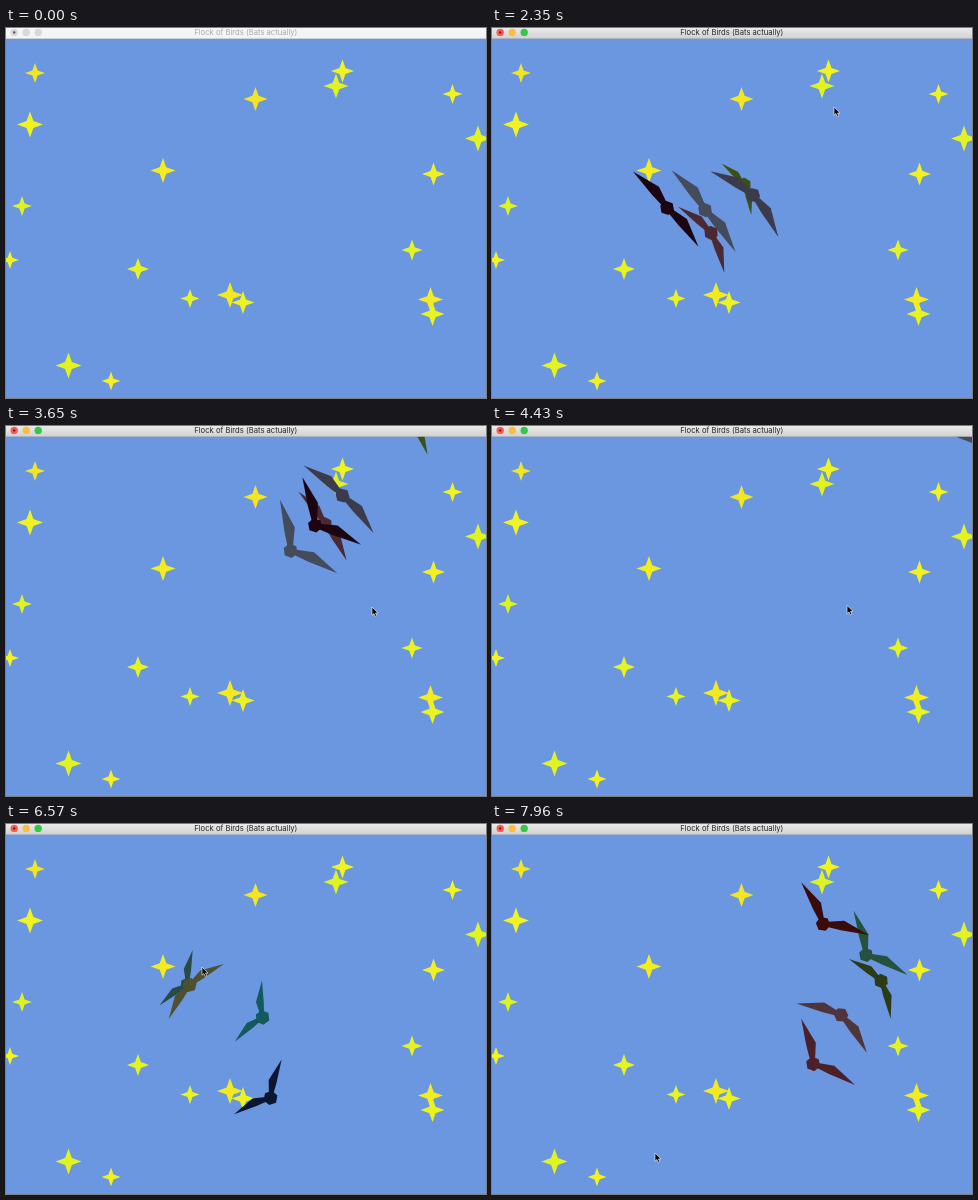
An HTML page with a canvas that plays this animation: 480x370 px, repeating every 8000 ms.

```html
<!DOCTYPE html>
<html lang="en">
<head>
<meta charset="utf-8">
<title>Flock of Birds (Bats actually)</title>
<style>
  html, body { margin: 0; width: 100%; height: 100%; overflow: hidden; }
  canvas { display: block; }
</style>
</head>
<body>
<canvas id="stage" width="480" height="370"></canvas>
<script>
const ctx = document.getElementById('stage').getContext('2d');
const LOOP = 8000, ACTIVATE = 870;
const FLAP_PERIOD = 390, SPREAD = 88, FLAP = 26;
const CRUISE = 0.1, RUSH = 400;

// x, y, radius
const stars = [
  [29, 45, 10], [24, 96.5, 13], [16, 178, 10], [4, 232, 9], [62.5, 337.5, 13],
  [105, 353, 9.5], [132, 241, 11], [157, 142.5, 12.5], [184, 270.5, 9.5], [224, 267, 13],
  [237, 274.5, 11.5], [249.5, 71, 12], [336.5, 43, 11.5], [330, 58, 12.5], [446.5, 66, 10],
  [472, 110.5, 13], [427.5, 146, 11.5], [406, 222, 10.5], [424.5, 271.5, 12.5], [426.5, 286, 12]
];

// Bats pass their place (x, y) at the flock's time. Headings and flap phases are in degrees.
const flocks = [
  {
    time: 2350, enter: [0, 1500], leave: [3700, 4900],
    bats: [
      { color: '#434b5c', x: 213, y: 182, heading: -38, span: 52, phase: 170, drift: [0.055, -0.044] },
      { color: '#3c5012', x: 252, y: 157, heading: -30, span: 31, phase: 45, drift: [0.12, -0.12] },
      { color: '#4b2932', x: 219, y: 205, heading: -35, span: 42, phase: 45, drift: [0.077, -0.082] },
      { color: '#1c0410', x: 175, y: 180, heading: -41, span: 50, phase: 170, drift: [0.103, -0.062] },
      { color: '#3c3b4c', x: 261, y: 167, heading: -46, span: 49, phase: 40, drift: [0.058, -0.075] }
    ]
  },
  {
    time: 5300, enter: [4100, 5200], leave: [6700, 7900],
    bats: [
      { color: '#0b1732', x: 323, y: 354, heading: 221, span: 40, phase: 205, drift: [-0.046, -0.063] },
      { color: '#294a47', x: 334, y: 219, heading: 211, span: 35, phase: 215, drift: [-0.12, -0.046] },
      { color: '#125a5b', x: 329, y: 229, heading: 204, span: 37, phase: 205, drift: [-0.057, -0.028] },
      { color: '#4f5030', x: 359, y: 283, heading: 225, span: 40, phase: 50, drift: [-0.138, -0.096] }
    ]
  },
  {
    time: 7960, enter: [6650, 7900], leave: [8000, 9000],
    bats: [
      { color: '#24523c', x: 374, y: 131, heading: -40, span: 46, phase: -60 },
      { color: '#390b0a', x: 331, y: 100, heading: -52, span: 47, phase: -60 },
      { color: '#2b3b16', x: 389, y: 157, heading: -35, span: 39, phase: 60 },
      { color: '#50343b', x: 349, y: 191, heading: -55, span: 46, phase: 60 },
      { color: '#4b2028', x: 321, y: 240, heading: -39, span: 47, phase: -60 }
    ]
  }
];

// Arrival time, x, y
const cursorStops = [
  [870, 345, 5], [1250, 342, 79], [3600, 366, 181],
  [5200, 175, 154], [6500, 196, 143], [7900, 163, 329]
];

const mix = (a, b, u) => a + (b - a) * u;
const radians = degrees => degrees * Math.PI / 180;
const progress = (t, [from, to]) => Math.min(1, Math.max(0, (t - from) / (to - from)));

function polygon(points, color) {
  ctx.fillStyle = color;
  ctx.beginPath();
  for (const [x, y] of points) ctx.lineTo(x, y);
  ctx.fill();
}

function ring(x, y, count, radiusAt, turn = 0) {
  return Array.from({ length: count }, (_, i) => {
    const a = turn + i * 2 * Math.PI / count, r = radiusAt(i);
    return [x + r * Math.cos(a), y + r * Math.sin(a)];
  });
}

function circle(x, y, r, color) {
  ctx.fillStyle = color;
  ctx.beginPath();
  ctx.arc(x, y, r, 0, 2 * Math.PI);
  ctx.fill();
}

function drawStar([x, y, r], i) {
  const hue = 56 + i * 5 % 11;
  polygon(ring(x, y, 8, k => k % 2 ? r * 0.37 : r), `hsl(${hue}, 90%, 54%)`);
}

// side is -1 for the left wing and 1 for the right; the leading edge bulges forward
function drawWing(x, y, angle, side, span, color) {
  const c = Math.cos(angle), s = Math.sin(angle);
  const at = (along, forward) => [
    x + span * (c * along + s * forward * side),
    y + span * (s * along - c * forward * side)
  ];
  polygon([at(0, 0.04), at(0.42, 0.17), at(1, 0), at(0.4, -0.04), at(0, -0.04)], color);
}

function drawBat(bat, flock, t) {
  const heading = radians(bat.heading), c = Math.cos(heading), s = Math.sin(heading);
  const [vx, vy] = bat.drift || [CRUISE * c, CRUISE * s];
  const age = t - flock.time;
  // Rush in from behind, cruise, then rush off ahead
  const rush = RUSH * (progress(t, flock.leave) ** 2 - (1 - progress(t, flock.enter)) ** 2);
  const x = bat.x + vx * age + rush * c, y = bat.y + vy * age + rush * s;
  const spread = SPREAD + FLAP * Math.sin(2 * Math.PI * age / FLAP_PERIOD + radians(bat.phase));
  for (const side of [-1, 1]) {
    drawWing(x, y, heading + side * radians(spread), side, bat.span, bat.color);
  }
  polygon(ring(x, y, 6, () => 7.3, heading), bat.color);
}

function drawTitleBar(active) {
  const shade = ctx.createLinearGradient(0, 0, 0, 11);
  shade.addColorStop(0, active ? '#eaeaea' : '#f6f6f6');
  shade.addColorStop(1, active ? '#d0d0d0' : '#f3f3f3');
  ctx.fillStyle = shade;
  ctx.fillRect(0, 0, 480, 10.5);
  ctx.fillStyle = active ? '#b5b5b5' : '#dadada';
  ctx.fillRect(0, 10.3, 480, 0.6);
  ['#fb5b55', '#fdbd3d', '#34c84a'].forEach((color, i) => {
    circle(8.2 + i * 12, 4.4, 3.7, active ? color : '#d8d8d8');
  });
  circle(8.2, 4.4, 1.2, active ? '#8a1510' : '#555');
  ctx.font = '7.65px Inter, Arial, sans-serif';
  ctx.textAlign = 'center';
  ctx.fillStyle = active ? '#262626' : '#aaa';
  ctx.fillText('Flock of Birds (Bats actually)', 239.8, 7.2);
}

function drawCursor(t) {
  let [, x, y] = cursorStops[0];
  for (const [arrival, toX, toY] of cursorStops) {
    const u = progress(t, [Math.max(ACTIVATE, arrival - 900), arrival + 1]);
    const ease = u * u * (3 - 2 * u);
    x = mix(x, toX, ease);
    y = mix(y, toY, ease);
  }
  ctx.save();
  ctx.translate(x, y);
  polygon([[0, 0], [0, 8.2], [1.9, 6.5], [3.2, 9.4], [4.7, 8.7], [3.5, 6], [6, 5.9]], '#000');
  ctx.strokeStyle = '#fff';
  ctx.lineWidth = 0.6;
  ctx.closePath();
  ctx.stroke();
  ctx.restore();
}

function draw(t) {
  const active = t >= ACTIVATE;
  ctx.fillStyle = '#6a97e0';
  ctx.fillRect(0, 0, 480, 370);
  stars.forEach(drawStar);
  for (const flock of flocks) {
    if (t < flock.enter[0] || t > flock.leave[1]) continue;
    for (const bat of flock.bats) drawBat(bat, flock, t);
  }
  drawTitleBar(active);
  if (active) drawCursor(t);
}

const start = performance.now();
function tick() {
  draw((performance.now() - start) % LOOP);
  requestAnimationFrame(tick);
}
tick();
</script>
</body>
</html>
```
